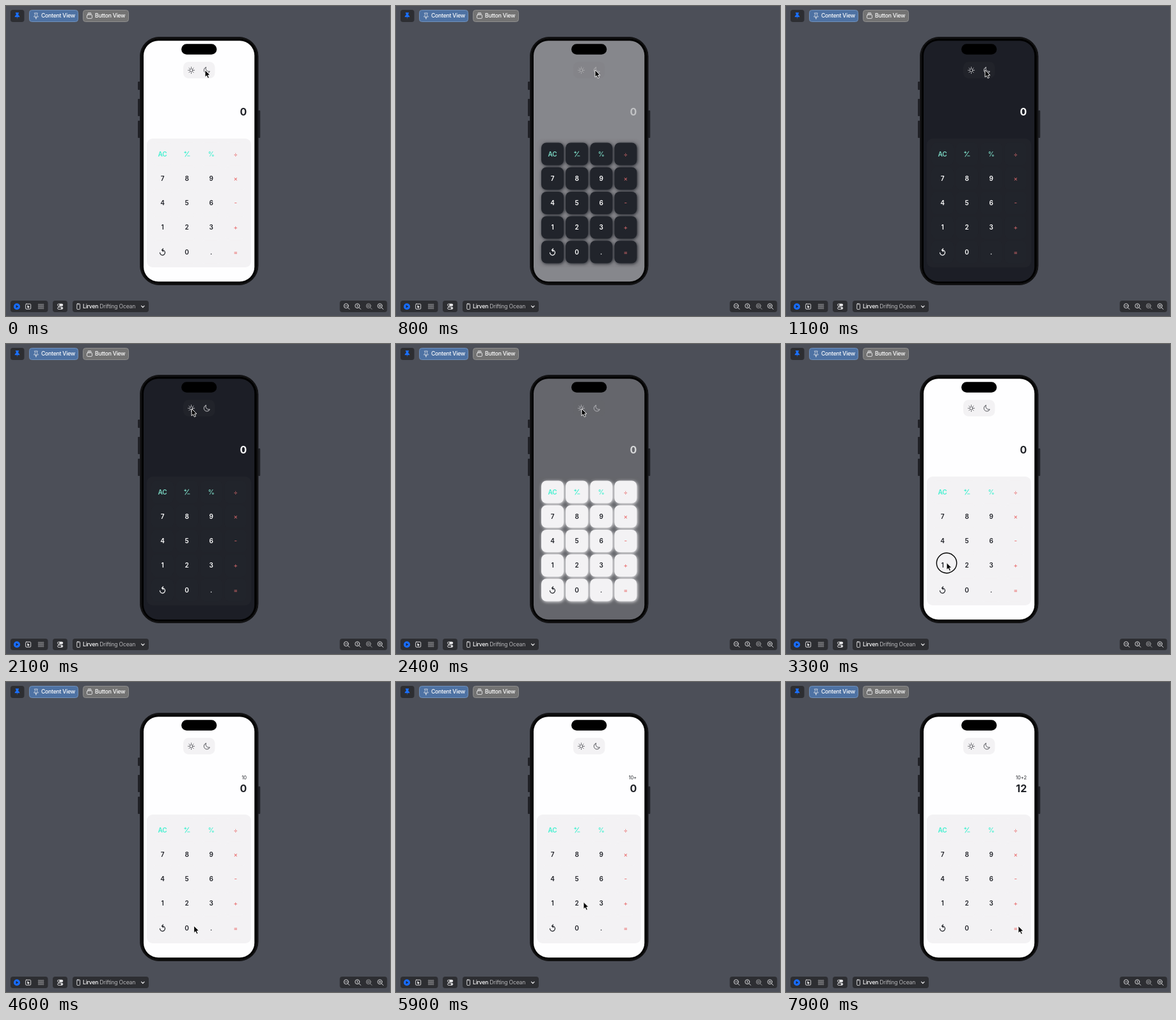
These frames come from a looping animation (600x484 px, 8000 ms). An HTML page:

```html
<!DOCTYPE html>
<html lang="en">
<head>
<meta charset="utf-8">
<style>
  html, body { margin: 0; width: 100%; height: 100%; overflow: hidden; background: #4c4f58; }
  svg { display: block; width: 100%; height: 100%; font-family: Inter, "Liberation Sans", sans-serif; }
  .ui { font-size: 8.7px; letter-spacing: -.25px; fill: #fff; font-weight: 500; }
  .line { fill: none; stroke: #e8e8ea; stroke-width: .9; stroke-linecap: round; stroke-linejoin: round; }
  .key text { font-size: 10px; font-weight: 600; text-anchor: middle; }
  .key .line { stroke: currentColor; }
  #result { font-size: 16px; font-weight: 700; text-anchor: end; }
  #sum { font-size: 7.6px; text-anchor: end; letter-spacing: -.1px; fill: #24262c; }
</style>
</head>
<body>
<svg id="stage" viewBox="0 0 600 484"></svg>
<script>
const LOOP = 8000, FADE = 500, PRESS = 150;
const TO_DARK = 540, TO_LIGHT = 2210;

// Cursor stops: time, x, y
const stops = [
  [0, 311, 100.5], [1300, 311, 100.5], [1900, 290, 101.5], [2700, 290, 101.5],
  [3200, 251, 342], [3600, 251, 342], [4000, 288, 384], [4500, 288, 384],
  [5100, 364, 346], [5500, 364, 346], [5900, 293, 344], [6500, 293, 344],
  [7100, 363, 381.5], [LOOP, 363, 381.5]
];
const presses = [400, 2150, 3300, 4200, 5200, 6100, 7300];
const sums = [[0, ''], [3450, '1'], [4350, '10'], [5350, '10+'], [6250, '10+2']];
const RESULT_AT = 7450;

const themes = {
  light: { screen: [254, 254, 255], panel: [243, 242, 244], ink: [32, 34, 40], icon: [70, 71, 76],
           key: '#f3f2f4', digit: '#202228', green: '#43f0d0', red: '#e85c5c' },
  dark:  { screen: [28, 30, 38], panel: [33, 35, 42], ink: [255, 255, 255], icon: [215, 215, 218],
           key: '#21242b', digit: '#fff', green: '#7ad6c2', red: '#dc6a6d' }
};

const rect = (x, y, w, h, r, fill, extra = '') =>
  `<rect x="${x}" y="${y}" width="${w}" height="${h}" rx="${r}" fill="${fill}" ${extra}/>`;
const at = (x, y, body, extra = '') => `<g transform="translate(${x} ${y})" ${extra}>${body}</g>`;
const line = (d, extra = '') => `<path class="line" d="${d}" ${extra}/>`;
const label = (x, y, s) => `<text class="ui" x="${x}" y="${y}">${s}</text>`;

const pin = 'M-2.6-5h5.2v1.2l-1 .6.4 2.6c1.2.6 1.8 1.5 1.8 2.6h-7.6c0-1.1.6-2 1.8-2.6l.4-2.6-1-.6zM-.4 2h.8l-.4 3.5z';
const bar = (x, w) => rect(x, 460, w, 18, 4, '#2d2e32');
const lens = (x, mark, dim) => at(x, 469,
  `<circle class="line" cx="-.8" cy="-.8" r="3.5"/>` + line('M1.8 1.8L4.4 4.4', 'stroke-width="1.4"') +
  line(mark, 'style="stroke-width:.8"'), dim ? 'opacity=".6"' : '');

function toolbars() {
  let grid = '';
  for (let i = 0; i < 9; i++)
    grid += rect(50.5 + i % 3 * 3.1, 465.4 + (i / 3 | 0) * 2.8, 2.1, 1.8, .4, 'none', 'stroke="#b4b4b7" stroke-width=".6"');
  return rect(7, 6, 21.5, 19, 4, '#2d2e32') + at(17.5, 15.2, `<path d="${pin}" fill="#1a70ff"/>`) +
    rect(36.5, 6.5, 76, 18, 4, '#4e72a3', 'stroke="#7090ba"') +
    at(47, 15.3, line(pin, 'transform="scale(.85)"')) + label(55, 18.4, 'Content View') +
    rect(120.5, 6.5, 71, 18, 4, '#737373', 'stroke="#8e8e8e"') +
    at(130.5, 15.5, rect(-4, -1.7, 8, 5.6, 1.2, 'none', 'class="line"') + line('M-3-3.2h6M-2-4.7h4')) +
    label(139, 18.4, 'Button View') +
    bar(7, 58.5) + bar(73, 23) + bar(104, 119) + bar(521.5, 74) +
    at(17, 469.2, '<circle r="5" fill="#176cff"/><path d="M-1.4-2.4L2.5 0L-1.4 2.4z" fill="#202a3c"/>') +
    at(34.7, 469.2, rect(-4, -4, 8, 8, 1.2, 'none', 'class="line"') +
      '<path d="M-1.2-2.3L2.3 .8L.6 1L1.3 2.5L.5 2.8L-.1 1.3L-1.2 2.3z" fill="#fff"/>') + grid +
    at(84.7, 469.2, rect(-4.5, -4.4, 9, 4, 2, '#e8e8ea') + '<circle cx="-2.4" cy="-2.4" r="1.3" fill="#2d2e32"/>' +
      rect(-4.1, .9, 8.2, 3.3, 1.6, 'none', 'class="line"') + '<circle cx="2.4" cy="2.5" r="1.4" fill="#e8e8ea"/>') +
    at(113.2, 469.2, rect(-2.4, -4.4, 4.8, 8.8, 1.1, 'none', 'class="line"') + line('M-.6-3.2h1.2')) +
    label(120, 472.3, 'Lirven <tspan fill="#b5b5b8" font-weight="400">Drifting Ocean</tspan>') +
    line('M211.5 468.2l2.3 2.3l2.3-2.3', 'style="stroke-width:1.2"') +
    lens(532.3, 'M-2.3-.8h3') + lens(549.8, 'M-1.4-1.8l.8-.6v3.2') +
    lens(567.3, 'M-2-2h2.4v2.4h-2.4z', true) + lens(585, 'M-2.3-.8h3M-.8-2.3v3');
}

function phone() {
  const sides = [[206, 118, 13], [206, 145, 27], [206, 179, 27], [394, 163, 43]];
  return sides.map(([x, y, h]) => rect(x, y, 3.2, h, 1, '#202126')).join('') +
    rect(209.5, 48.5, 184.5, 387, 30, '#080808', 'stroke="#1b1b1e"') +
    rect(211.3, 50.3, 180.9, 383.4, 28, '#000', 'stroke="#29292b" stroke-width=".6"') +
    rect(215, 54.2, 173.2, 376, 23, '#fff', 'id="screen"') +
    rect(274, 59.3, 55.3, 16.4, 8.2, '#000') +
    rect(277, 87.3, 49.4, 25.6, 8, '#eee', 'id="pill"') +
    rect(220, 207, 163, 201, 9, '#eee', 'id="panel"');
}

function toggles() {
  let rays = '';
  for (let i = 0; i < 8; i++) {
    const c = Math.cos(i * Math.PI / 4), s = Math.sin(i * Math.PI / 4);
    rays += `M${c * 4.1} ${s * 4.1}L${c * 5} ${s * 5}`;
  }
  return '<g id="icons">' +
    at(289.5, 100.3, '<circle class="line" r="2.5" style="stroke:inherit"/>' + line(rays, 'style="stroke:inherit"')) +
    at(313.8, 100.3, line('M-1.5-4.6A4.8 4.8 0 1 0 4.6 1.7A4.9 4.9 0 0 1-1.5-4.6z', 'style="stroke:inherit"')) + '</g>';
}

const plusMinus = line('M-3.9-2.5h3M-2.4-4v3M-2.6 4L2.9-3.8M1 3h3.4', 'style="stroke-width:1.1"');
const undo = line('M-.6-2.9A4 4 0 1 1-4 1M1-5.2L-1-2.9L1.2-.8', 'style="stroke-width:1.2"');
const names = ['AC', plusMinus, '%', '÷', 7, 8, 9, '×', 4, 5, 6, '-', 1, 2, 3, '+', undo, 0, '.', '='];

function keys() {
  const faces = [], marks = [];
  names.forEach((n, i) => {
    const x = 244.5 + i % 4 * 38.1, y = 231 + (i / 4 | 0) * 38.25;
    const tone = i % 4 === 3 ? 'red' : i < 3 ? 'green' : 'digit';
    const mark = String(n).startsWith('<') ? n
      : `<text y="3.6" fill="currentColor" ${tone === 'red' ? 'style="font-weight:400"' : ''}>${n}</text>`;
    faces.push(rect(x - 17.5, y - 17.5, 35, 35, 8, 'currentColor'));
    marks.push(at(x, y, mark, `class="key" data-tone="${tone}"`));
  });
  return `<g id="faces">${faces.join('')}</g>` + marks.join('');
}

stage.innerHTML = rect(0, 0, 600, 484, 0, '#4c4f58') + toolbars() + phone() + toggles() +
  '<text id="sum" x="376" y="151.6"></text><text id="result" x="376.3"></text>' + keys() +
  '<g id="cursor"><circle id="ring" r="15.7" fill="none" stroke="#000" stroke-width="1.4"/>' +
  '<path d="M0-.5V10.6L2.5 8.3L4.4 12.3L6.4 11.4L4.6 7.5H8z" fill="#000" stroke="#fff" stroke-width=".9" stroke-linejoin="round"/></g>';

const el = id => document.getElementById(id);
const clamp = v => Math.max(0, Math.min(1, v));
const ease = v => (v = clamp(v), v * v * (3 - 2 * v));
const blend = (name, k) =>
  `rgb(${themes.light[name].map((v, i) => Math.round(v + (themes.dark[name][i] - v) * k))})`;

function cursorAt(t) {
  const i = stops.findIndex(s => s[0] > t);
  const [a, x, y] = stops[i - 1], [b, u, v] = stops[i];
  const k = ease((t - a) / (b - a));
  return [x + (u - x) * k, y + (v - y) * k];
}

function draw(t) {
  // Screen colours fade; the keys switch theme at once.
  const k = ease((t - TO_DARK) / FADE) - ease((t - TO_LIGHT) / FADE);
  const theme = t >= TO_DARK && t < TO_LIGHT ? themes.dark : themes.light;
  el('screen').setAttribute('fill', blend('screen', k));
  for (const id of ['pill', 'panel']) el(id).setAttribute('fill', blend('panel', k));
  el('icons').style.stroke = blend('icon', Math.sqrt(k));
  el('faces').style.color = theme.key;
  el('faces').style.filter = k > 0 && k < 1 ? `drop-shadow(1.5px 1.5px 2.5px ${theme.key})` : 'none';
  for (const g of document.querySelectorAll('.key')) g.style.color = theme[g.dataset.tone];

  const sum = sums.filter(s => s[0] <= t).pop()[1];
  el('sum').textContent = sum;
  el('result').textContent = t >= RESULT_AT ? '12' : '0';
  el('result').setAttribute('y', sum ? 172.4 : 171);
  el('result').setAttribute('fill', blend('ink', Math.sqrt(k)));

  el('cursor').setAttribute('transform', `translate(${cursorAt(t)})`);
  el('ring').style.display = presses.some(p => t >= p && t < p + PRESS) ? '' : 'none';
}

const start = performance.now();
function tick() {
  const t = (performance.now() - start) % LOOP;
  draw(Math.floor(t / 100) * 100); // ten pictures a second
  requestAnimationFrame(tick);
}
tick();
</script>
</body>
</html>
```
